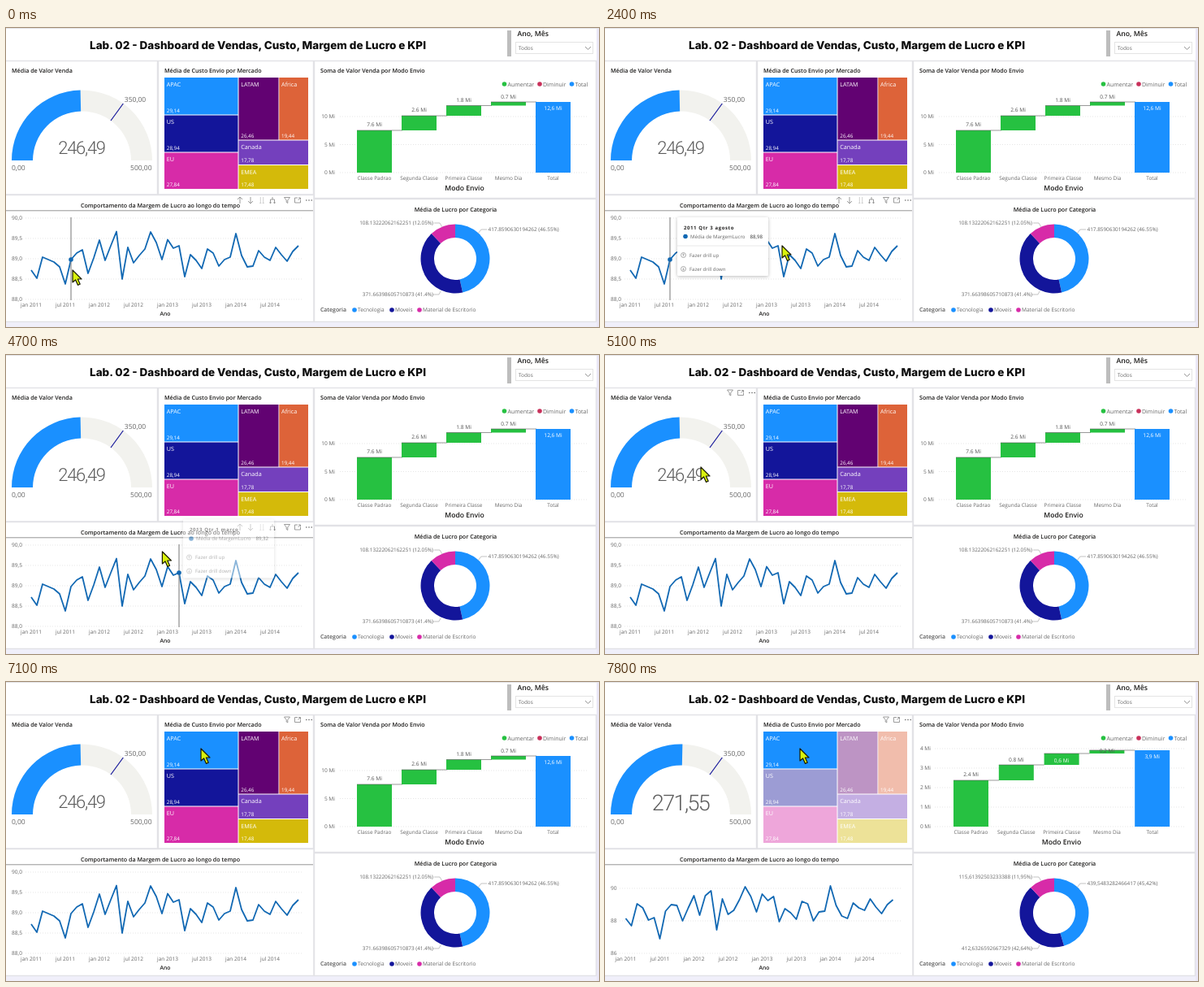
Animation, 730 px wide and 368 px high, one loop 8000 ms. Source, as an HTML page:

```html
<!DOCTYPE html>
<html lang="pt">
<head>
<meta charset="utf-8">
<title>Dashboard</title>
<style>
html, body { margin: 0; width: 100%; height: 100%; overflow: hidden; background: #fff; }
svg { display: block; width: 730px; height: 368px; font-family: "Open Sans", "Noto Sans", sans-serif; text-rendering: geometricPrecision; }
.title { font-family: Inter, sans-serif; font-weight: 800; }
.big { font-family: Roboto, sans-serif; font-weight: 300; letter-spacing: -.06em; }
.bold { font-weight: 600; }
.tip { font-weight: 700; letter-spacing: .6px; }
.card { filter: drop-shadow(0 1px 2px #0004); }
</style>
</head>
<body>
<svg id="stage" viewBox="0 0 730 368"></svg>
<script>
const stage = document.getElementById('stage');
const LOOP = 8000, STEP = 100, MONTH = 7;
const BLUE = '#1a90ff', NAVY = '#13159a', PINK = '#d72ba8', GREEN = '#26c141', LINE = '#1168b3';

const seriesA = [298, 308, 282, 285, 288, 294, 315, 285, 277, 273, 302, 283, 261, 286, 268, 250.5,
  309, 270, 289, 280, 272, 251, 264, 285, 260.5, 271, 268, 306, 279, 286, 296, 272,
  277, 293, 285, 282, 253, 280, 294, 293, 274, 282, 286, 270, 279, 287, 275, 268];
const seriesB = [291, 300, 273, 278, 293, 290, 316, 282, 274, 275, 294, 278, 263, 287, 263, 257,
  305, 267, 286, 281, 268, 252, 264, 283, 261, 269, 264, 295, 279, 284, 292, 270,
  273, 294, 283, 282, 251, 275, 288, 291, 272, 278, 281, 267, 277, 285, 274, 268];

const pointer = [[0, 82, 298], [1600, 82, 298], [1700, 105, 288], [2400, 218, 268], [2600, 211, 268],
  [4600, 211, 268], [5100, 118, 138], [5300, 114, 139], [5400, 114, 139], [6300, 229, 94], [6500, 240, 82]];

const mix = (a, b, k) => a + (b - a) * k;
const ramp = (t, a, b) => Math.min(1, Math.max(0, (t - a) / (b - a)));

function pointerAt(t) {
  const i = pointer.findIndex(p => p[0] > t);
  if (i < 0) return pointer.at(-1).slice(1);
  const [a, b] = [pointer[i - 1], pointer[i]], k = ramp(t, a[0], b[0]);
  return [mix(a[1], b[1], k), mix(a[2], b[2], k)];
}

// y is the middle of the capitals
const text = (x, y, s, size = 6.4, fill = '#666', anchor = 'start', cls = '') =>
  `<text x="${x}" y="${y + size * .36}" font-size="${size}" fill="${fill}" text-anchor="${anchor}" class="${cls}">${s}</text>`;
const mid = (x, y, s, size, fill, cls) => text(x, y, s, size, fill, 'middle', cls);
const heading = (x, y, s, size = 7.15, anchor = 'start') => text(x, y, s, size, '#1c1b1a', anchor, 'bold');
const rect = (x, y, w, h, fill, more = '') => `<rect x="${x}" y="${y}" width="${w}" height="${h}" fill="${fill}" ${more}/>`;
const dot = (x, y, fill, r = 2.8) => `<circle cx="${x}" cy="${y}" r="${r}" fill="${fill}"/>`;
const path = (d, stroke, width = 1, more = '') => `<path d="${d}" fill="none" stroke="${stroke}" stroke-width="${width}" ${more}/>`;
const grid = (x1, x2, y) => path(`M${x1} ${y}H${x2}`, '#dcdcdc', .7, 'stroke-dasharray="1 2"');

// angles in turns, clockwise from the top
function ring(cx, cy, r, R, a, b, fill) {
  const at = (rad, turn) => `${cx + rad * Math.sin(turn * 2 * Math.PI)} ${cy - rad * Math.cos(turn * 2 * Math.PI)}`;
  const big = b - a > .5 ? 1 : 0;
  return `<path fill="${fill}" d="M${at(R, a)}A${R} ${R} 0 ${big} 1 ${at(R, b)}L${at(r, b)}A${r} ${r} 0 ${big} 0 ${at(r, a)}Z"/>`;
}

function frame() {
  const panels = [[-1, 40.5, 187.5, 164.5], [187.5, 40.5, 191, 164.5], [379.5, 40.5, 347, 169],
    [-1, 205.5, 380, 156], [379.5, 210.5, 347, 151]];
  return rect(0, 362, 730, 6, '#f0effa') + rect(727, 0, 3, 368, '#ebe8f7') + rect(0, 0, 730, 1, '#e4e4e8') +
    panels.map(p => rect(...p, '#fff', 'stroke="#e2e2e6" stroke-width="1.4"')).join('') +
    mid(310, 21.5, 'Lab. 02 - Dashboard de Vendas, Custo, Margem de Lucro e KPI', 13.5, '#0c0c0c', 'title') +
    rect(617, 3, 5, 32, '#bdbdbd') + heading(629.5, 7, 'Ano, Mês', 8.7) +
    rect(627.5, 17.5, 95, 14, '#fff', 'stroke="#e4e4e4"') + text(631, 24.5, 'Todos') +
    path('M713 23l3.5 3.5 3.5-3.5', '#777', .8);
}

function gauge(k, updated) {
  const share = mix(.493, .507, k);
  return heading(7, 52.6, 'Média de Valor Venda') +
    ring(93.5, 163, 60.5, 86.5, -.25, .25, '#f2f2ee') +
    ring(93.5, 163, 60.5, 86.5, -.25, -.25 + share / 2, BLUE) +
    path('M129 114L144.3 93', NAVY, 1.2) +
    mid(159, 88, '350,00', 8.5) + text(7, 171.5, '0,00', 8.5) + text(179.5, 171.5, '500,00', 8.5, '#666', 'end') +
    (updated ? mid(93, 148, '271,55', 27, '#5c5c5c', 'big') : mid(93, 147, '246,49', 22, '#5c5c5c', 'big'));
}

function treemap(dim) {
  const cells = [['APAC', '29,14', 195, 61, 90.5, 45.5, BLUE], ['US', '28,94', 195, 107.5, 90.5, 45, NAVY],
    ['EU', '27,84', 195, 153.5, 90.5, 44.5, PINK], ['LATAM', '26,46', 286.5, 61, 49, 76.5, '#620272'],
    ['Africa', '19,44', 336.3, 61, 35.7, 76.5, '#dd6339'], ['Canada', '17,78', 286.5, 138.5, 85.5, 29.5, '#7440bd'],
    ['EMEA', '17,48', 286.5, 169, 85.5, 29, '#d4ba0a']];
  return heading(195, 52.6, 'Média de Custo Envio por Mercado') + cells.map(([name, value, x, y, w, h, fill], i) =>
    rect(x, y, w, h, fill, `opacity="${i ? 1 - .58 * dim : 1}"`) +
    text(x + 2.8, y + 8, name, 7.2, '#fff') + text(x + 2.8, y + h - 5, value, 6.3, '#fff')).join('');
}

function waterfall(k) {
  const late = k >= .5;
  const topsA = [178, 126, 108, 95.5, 91], topsB = [178, 121, 102, 88, 84];
  const tops = topsA.map((y, i) => mix(y, topsB[i], k));
  const names = ['Classe Padrao', 'Segunda Classe', 'Primeira Classe', 'Mesmo Dia', 'Total'];
  const labels = late
    ? [['2.4 Mi', 114], ['0.8 Mi', 96], ['0,6 Mi', 97], ['0,2 Mi', 85], ['3,9 Mi', 92]]
    : [['7.6 Mi', 119], ['2.6 Mi', 101], ['1.8 Mi', 89], ['0.7 Mi', 85], ['12,6 Mi', 99]];
  let out = heading(387, 52.6, 'Soma de Valor Venda por Modo Envio');
  [['Aumentar', GREEN, 613.5], ['Diminuir', '#c8305a', 657], ['Total', BLUE, 696.5]].forEach(([s, c, x]) =>
    out += dot(x, 69, c) + text(x + 4, 69, s, 7));
  for (let i = 0; i <= (late ? 4 : 2); i++) {
    const y = 178 - i * (late ? 24 : 34.5);
    out += grid(late ? 406 : 411, 715, y) + text(late ? 401 : 405, y, `${late ? i : i * 5} Mi`, 6.6, '#666', 'end');
  }
  names.forEach((name, i) => {
    const x = mix(432, 429, k) + i * mix(55, 55.8, k), total = i === 4;
    const top = tops[total ? 4 : i + 1], base = total ? 178 : tops[i];
    out += rect(x, top, 43, base - top, total ? BLUE : GREEN);
    if (!total) out += path(`M${x} ${top}H${x + 56}`, '#555', .6);
    const white = total || late && i === 2;
    out += mid(x + 21.5, labels[i][1], labels[i][0], 6.6, white ? '#fff' : '#555') + mid(x + 21.5, 184.5, name);
  });
  return out + heading(mix(564.5, 562, k), 197, 'Modo Envio', 8.6, 'middle');
}

function donut(k) {
  const late = k >= .5;
  const a = mix(.4655, .4542, k), b = mix(.8795, .8806, k);
  const [blue, navy, pink] = late
    ? ['439,5483282466417 (45,42%)', '412,6326592667329 (42,64%)', '115,61392503233388 (11,95%)']
    : ['417.8590630194262 (46.55%)', '371.66398605710873 (41.4%)', '108.13222062162251 (12.05%)'];
  let out = heading(553.5, 223, 'Média de Lucro por Categoria', 7.15, 'middle') +
    ring(553, 284, 26, 42.5, 0, a, BLUE) + ring(553, 284, 26, 42.5, a, b, NAVY) + ring(553, 284, 26, 42.5, b, 1, PINK) +
    path('M581 253L585 248H592', '#aaa', .7) + path('M527 240H534L537 245', '#aaa', .7) +
    path('M526 328H533L535 324', '#aaa', .7) +
    text(593.5, 248, blue) + text(526, 240, pink, 6.4, '#666', 'end') + text(526, 328, navy, 6.4, '#666', 'end') +
    text(387, 347, 'Categoria', 6.9, '#555', 'start', 'bold');
  [['Tecnologia', BLUE, 429], ['Moveis', NAVY, 475], ['Material de Escritorio', PINK, 509]].forEach(([s, c, x]) =>
    out += dot(x, 347, c) + text(x + 4, 347, s, 6.6));
  return out;
}

function lineChart(k) {
  const late = k >= .5, left = mix(31, 25.5, k);
  let out = path('M0 224.8H378', '#8a8a8a', .9) +
    heading(190, 218, 'Comportamento da Margem de Lucro ao longo do tempo', 7.15, 'middle');
  const ticks = late ? ['90', '88', '86'] : ['90,0', '89,5', '89,0', '88,5', '88,0'];
  ticks.forEach((s, i) => {
    const y = late ? 254 + 40 * i : 234 + 25 * i;
    out += grid(late ? 18 : 24, 366, y) + text(7, y, s, 6.6);
  });
  for (let i = 0; i < 8; i++)
    out += mid(left + i * 6 * MONTH, 341, `${i % 2 ? 'jul' : 'jan'} ${2011 + (i >> 1)}`, 6.5);
  const points = seriesA.map((y, i) => `${left + i * MONTH},${mix(y, seriesB[i], k)}`);
  return out + path('M' + points.join('L'), LINE, 1.8, 'stroke-linejoin="round"') + heading(196, 352, 'Ano', 6.8, 'middle');
}

function marker(i) {
  const x = 31 + i * MONTH;
  return path(`M${x} 233V335`, '#8c8c8c', 1.2) + dot(x, seriesA[i], LINE);
}

function tooltip(x, y, title, value, alpha, open) {
  if (!alpha) return '';
  const top = open ? y - 37 : y;
  let out = rect(x, top, 112, open ? 72 : 35, '#fff', 'rx="1.5" class="card"') +
    text(x + 8, top + 12.5, title, 6, '#252423', 'start', 'tip') +
    dot(x + 10, top + 23.5, LINE) + text(x + 16, top + 23.5, 'Média de MargemLucro', 6.1) +
    text(x + 105, top + 23.5, value, 6.1, '#333', 'end');
  if (open) {
    out += path(`M${x} ${top + 35}h112`, '#e2e2e2', .8);
    ['up', 'down'].forEach((s, i) => {
      const cy = top + 46.5 + 17 * i, d = i ? 1 : -1;
      out += `<circle cx="${x + 7.5}" cy="${cy}" r="3" fill="none" stroke="#888" stroke-width=".7"/>` +
        path(`M${x + 7.5} ${cy - 1.6 * d}v${3.2 * d}m-1.3 ${-1.3 * d}l1.3 ${1.3 * d} 1.3 ${-1.3 * d}`, '#888', .6) +
        text(x + 15, cy, 'Fazer drill ' + s, 6);
    });
  }
  return `<g opacity="${alpha}">${out}</g>`;
}

function toolbar(x, y, drill) {
  const icon = (dx, d, c = '#858585') => path(`M${x + dx} ${y}${d}`, c, .8);
  let out = icon(-27, 'm-3.5-3.5h7l-2.7 3.5v3.5l-1.6-1v-2.5z') +
    icon(-14, 'm0-3h-3.5v6h7v-3m-3 0l3-3m-2.5 0h2.5v2.5') +
    [-3.2, 0, 3.2].map(dx => dot(x + dx, y, '#666', .8)).join('');
  if (drill)
    out += icon(-85, 'm0 4v-8m-3 3l3-3 3 3') + icon(-72, 'm0-4v8m-3-3l3 3 3-3') +
      icon(-58, 'm-1.7-4v8m3.4-8v8m-4.400-1l1 1 1-1m1.400 0l1 1 1-1', '#c4c4c4') +
      icon(-45, 'm0-4v3m-2.5 5v-5h5v5m-6-1.5l1 1.5 1-1.5m3 0l1 1.5 1-1.5');
  return out;
}

const cursor = (x, y) => `<path transform="translate(${x} ${y})" d="M0 0V15L3.6 12 6.5 18.4 9.2 17.2 6.4 11H11Z"
  fill="#d9f20c" stroke="#1a1a00" stroke-width="1.2" stroke-linejoin="round"/>`;

function draw(t) {
  const k = ramp(t, 7600, 7800), [x, y] = pointerAt(t);
  const bar = y > 206 ? toolbar(373, 212, true) : toolbar(x < 187 ? 181 : 373, 46.5);
  const hovered = t < 2600 ? 7 : t >= 2900 && t < 4800 ? 26 : -1;
  stage.innerHTML = frame() + gauge(k, t >= 7300) + treemap(ramp(t, 7100, 7300)) + waterfall(k) + donut(k) +
    lineChart(k) + bar + (hovered < 0 ? '' : marker(hovered)) +
    tooltip(89, 270, '2011 Qtr 3 agosto', '88,98', t < 2600 ? ramp(t, 0, 300) : 0, t >= 1800) +
    tooltip(218, 239.5, '2013 Qtr 1 março', '89,32', ramp(t, 2900, 3200) * (1 - ramp(t, 4600, 4800)), t >= 4000) +
    cursor(x, y);
}

let last = -1;
function tick(now) {
  const t = Math.floor(now % LOOP / STEP) * STEP;
  if (t !== last) draw(last = t);
  requestAnimationFrame(tick);
}
tick(0);
</script>
</body>
</html>
```
